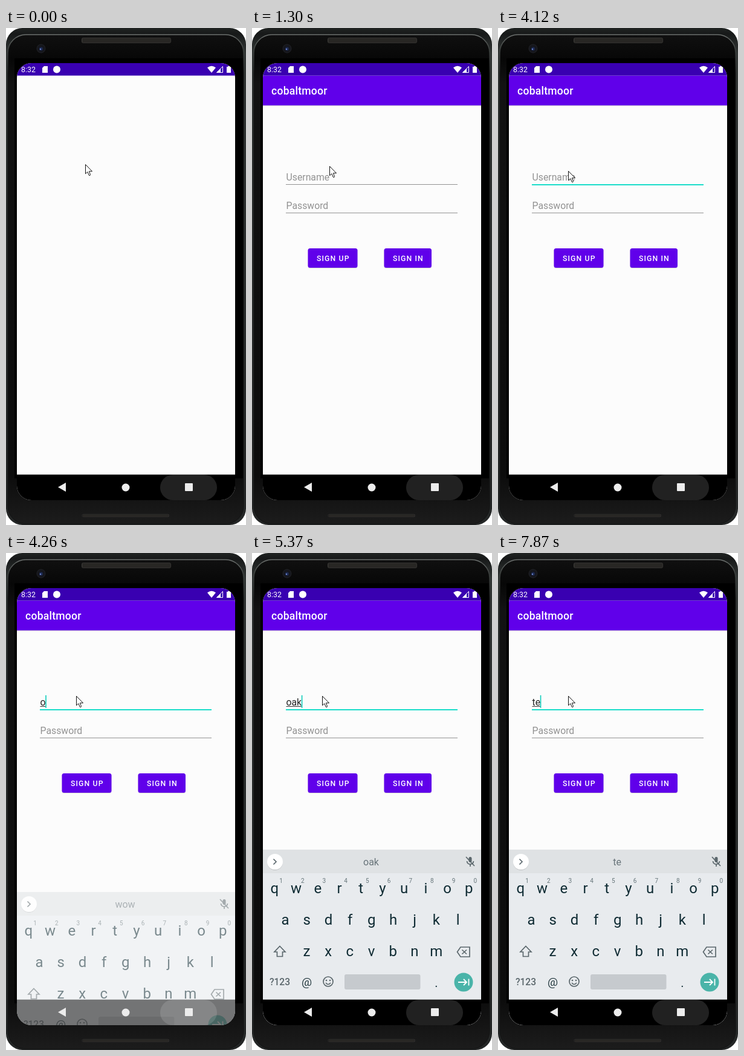
Animation of 397x821 px, one loop 8000 ms. Source, as an HTML page:

```html
<!DOCTYPE html>
<html lang="en">
<head>
<meta charset="utf-8">
<title>Sign-in screen</title>
<style>
html, body { margin: 0; width: 100%; height: 100%; overflow: hidden; background: #fff; }
svg { display: block; width: 397px; height: 821px; font-family: Roboto, sans-serif; }
.mid { text-anchor: middle; }
.medium { font-weight: 500; }
.line { fill: none; stroke: #5b676c; stroke-width: 1.7; }
</style>
</head>
<body>
<svg viewBox="0 0 397 821">
  <defs>
    <clipPath id="screen"><rect x="18" y="58" width="361" height="722" rx="24"/></clipPath>
    <linearGradient id="rim" x2="0" y2="1">
      <stop offset="0" stop-color="#202322"/><stop offset=".012" stop-color="#171919"/>
      <stop offset=".05" stop-color="#333736"/><stop offset="1" stop-color="#242626"/>
    </linearGradient>
    <linearGradient id="edge" x2="0" y2="1">
      <stop offset="0" stop-color="#6c706e"/><stop offset=".03" stop-color="#3c403e"/><stop offset=".08" stop-color="#151616"/>
    </linearGradient>
    <linearGradient id="face" x2="0" y2="1">
      <stop offset="0" stop-color="#101010"/><stop offset=".05" stop-color="#070707"/>
      <stop offset=".1" stop-color="#121212"/><stop offset=".9" stop-color="#0c0c0c"/><stop offset="1" stop-color="#1c1c1c"/>
    </linearGradient>
    <pattern id="mesh" width="2" height="2" patternUnits="userSpaceOnUse">
      <rect width="2" height="2" fill="#1d1c1a"/><rect width="1" height="1" fill="#494642"/>
    </pattern>
    <filter id="shadow" x="-10%" y="-20%" width="120%" height="160%">
      <feDropShadow dx="0" dy="1" stdDeviation=".7" flood-opacity=".16"/>
    </filter>
  </defs>

  <rect width="397" height="821" rx="27" fill="url(#rim)"/>
  <rect x="3" y="11" width="390" height="808" rx="30" fill="url(#face)" stroke="url(#edge)" stroke-width="1.6"/>
  <rect x="14" y="50" width="378" height="694" fill="#000"/>
  <rect x="125.5" y="16.5" width="147" height="8" rx="2" fill="url(#mesh)" stroke="#3a3937"/>
  <rect x="126" y="803" width="144" height="5" rx="2" fill="url(#mesh)" stroke="#262626"/>
  <circle cx="58" cy="34" r="7" fill="#15161c" stroke="#222327"/>
  <circle cx="58" cy="34.5" r="3" fill="#1c2950"/><circle cx="57" cy="35" r="1.2" fill="#6f86c9"/>

  <g clip-path="url(#screen)">
    <rect x="18" y="58" width="361" height="722" fill="#fcfcfc"/>
    <g id="app">
      <rect x="18" y="78.6" width="361" height="49.2" fill="#6002ea" filter="url(#shadow)"/>
      <text x="32" y="110" font-size="17.6" letter-spacing=".2" class="medium" fill="#fff">cobaltmoor</text>
      <text id="hint" x="56.5" y="252" font-size="15.8" fill="#929292">Username</text>
      <text x="56.5" y="298.5" font-size="15.8" fill="#929292">Password</text>
      <path d="M56 258.5H340M56 305.5H340" stroke="#939393"/>
      <rect id="focus" x="56" y="258" width="284" height="1.8" fill="#03dac5"/>
      <text id="typed" x="56.5" y="252" font-size="15.8" fill="#262626"></text>
      <rect id="composing" x="56.5" y="253" height="1" fill="#333"/>
      <rect id="caret" y="235" width="1.6" height="21" fill="#0fcdbb"/>
      <g id="buttons"></g>
    </g>
    <rect x="18" y="58" width="361" height="20.6" fill="#3900b1"/>
    <g fill="#fff">
      <text x="25" y="73" font-size="12.4">8:32</text>
      <path d="M63 63H69V74H60V66Z"/>
      <circle cx="84" cy="68.5" r="6"/>
      <path d="M333 65.5Q340 60 347 65.5L340 74Z"/>
      <path d="M348.5 73.5L358.5 63.5V73.5Z" fill="none" stroke="#fff"/><path d="M348 74L355 67V74Z"/>
      <path d="M365 64H367V63H370V64H372V74H365Z"/>
    </g>
    <g id="keyboard"></g>
    <rect id="nav" x="18" y="737.7" width="361" height="43"/>
    <rect x="255" y="738" width="94" height="42" rx="21" fill="#fff" opacity=".13"/>
    <g fill="#ececec">
      <path d="M86 758.5L99 751V766Z"/><circle cx="198" cy="759" r="6.5"/>
      <rect x="296" y="752" width="13" height="13" rx="1"/>
    </g>
  </g>
  <path id="pointer" d="M.5 .5V15.8L3.8 12.7L6.4 18.5H8L8.5 17.2L6.4 11.8H11.5Z" fill="#fff" stroke="#111"/>
</svg>
<script>
const LOOP = 8000;
const $ = id => document.getElementById(id);
const label = (text, x, y, size, fill, extra = '') =>
  `<text class="mid ${extra}" x="${x}" y="${y}" font-size="${size}" fill="${fill}">${text}</text>`;

$('buttons').innerHTML = [['SIGN UP', 92.5, 82], ['SIGN IN', 218.5, 78.5]].map(([text, x, w]) =>
  `<rect x="${x}" y="364" width="${w}" height="32" rx="3.5" fill="#6002ea" filter="url(#shadow)"/>
   <text class="medium" x="${x + 14.5}" y="385" font-size="12.3" letter-spacing="1.09" fill="#fff">${text}</text>`).join('');

const keyRow = (letters, x, y) =>
  [...letters].map((c, i) => label(c, x + i * 35.7, y, 24, '#0f2b33')).join('');
const digits = [...'1234567890'].map((d, i) => label(d, 48 + i * 35.7, 545, 10, '#66757a')).join('');

$('keyboard').innerHTML = `
  <rect x="18" y="490" width="361" height="290" fill="#e8ebee"/>
  <rect x="18" y="490" width="361" height="39" fill="#dfe2e4"/>
  <circle cx="38" cy="510" r="13" fill="#fff" filter="url(#shadow)"/>
  <path id="chevron" class="line" d="M-2.5 -4.5L2 0L-2.5 4.5"/>
  <text id="suggestion" class="mid" x="197" y="515.5" font-size="16" fill="#68747a"></text>
  <g id="tools" fill="#5b676c">
    <rect x="80" y="502.5" width="14" height="14"/>
    <path d="M140 502a7.5 7.5 0 1 0 0 15c2 0 1.5-1.5 1-2.5s0-2 2-2h2c2 0 2.5-1.5 2.5-3.5c0-4-3.5-7-7.5-7"/>
    <g fill="#dfe2e4"><circle cx="135.5" cy="509.5" r="1.2"/><circle cx="138" cy="506" r="1.2"/><circle cx="142" cy="506" r="1.2"/><circle cx="144.5" cy="509.5" r="1.2"/></g>
    <path class="line" d="M189.5 503H194.5M192 503V516M189.5 516H194.5"/>
    <path d="M184 509.5L188 506.5V512.5ZM200 509.5L196 506.5V512.5Z"/>
    <rect class="line" x="238.5" y="503" width="13" height="13" rx="1"/>
    <path d="M242 506L248 508L246.5 509.5L252 515L250 517L244.5 511.5L243 513Z"/>
    <rect x="277" y="500" width="1" height="19" fill="#c8cdd0"/>
    <circle cx="304.5" cy="510" r="1.8"/><circle cx="310" cy="510" r="1.8"/><circle cx="315.5" cy="510" r="1.8"/>
  </g>
  <rect x="358.5" y="502" width="5" height="9" rx="2.5" fill="#5b676c"/>
  <path class="line" d="M355.5 509Q356 514 361 514T366.5 509M361 514V518M354 502L368 517"/>
  ${digits}
  ${keyRow('qwertyuiop', 37.4, 562)}${keyRow('asdfghjkl', 55, 613.8)}${keyRow('zxcvbnm', 90.5, 665.6)}
  <path class="line" d="M46 649.5L55 659H50.5V666.5H41.5V659H37Z"/>
  <path class="line" d="M345 651H360V667H345L339.5 659ZM347.5 655.5L355 662.5M355 655.5L347.5 662.5"/>
  ${label('?123', 46, 714, 15.6, '#5b676c', 'medium')}
  ${label('@', 90.5, 714.5, 19, '#24393f')}
  <circle class="line" cx="126" cy="708" r="8"/>
  <path class="line" d="M122 710Q126 715 130 710"/>
  <circle cx="123" cy="706" r="1.3" fill="#5b676c"/><circle cx="129" cy="706" r="1.3" fill="#5b676c"/>
  <rect x="153" y="696" width="125.5" height="25" rx="3" fill="#c6cace"/>
  ${label('.', 305, 717, 20, '#0f2b33')}
  <circle cx="350" cy="709" r="15.5" fill="#4ab4a9"/>
  <path d="M341 709H355M350 704L355 709L350 714M358.5 703.5V714.5" fill="none" stroke="#fff" stroke-width="1.8"/>`;

// Each track lists [start time, value]; a value holds until the next one.
const tracks = {
  app: [[0, 0], [780, .22], [920, 1]],
  focus: [[0, 0], [2540, .5], [2660, 1]],
  pointer: [[0, '131 225'], [1170, '130 226'], [1300, '128 228'], [1720, '127 229'], [1840, '125 231'],
    [2120, '123 234'], [2240, '120 238'], [2390, '116 241'], [2540, '116 236']],
  typed: [[0, ''], [4260, 'o'], [4390, 'oak'], [5630, 'oa'], [5750, 'o'], [5890, ''], [7710, 't'], [7870, 'te']],
  caret: [[0, 0], [2660, 1], [4120, 0], [4260, 1], [4790, 0], [5370, 1], [6440, 0], [6980, 1], [7410, 0], [7710, 1]],
  keyboard: [[0, 0], [4260, .55], [4390, .97], [4530, 1]],
  tools: [[0, 0], [6040, 1], [7710, 0]],
};
const at = (name, t) => tracks[name].findLast(([start]) => start <= t)[1];

function draw(t) {
  for (const name of ['app', 'focus', 'caret', 'keyboard', 'tools'])
    $(name).setAttribute('opacity', at(name, t));

  const text = at('typed', t);
  $('typed').textContent = text;
  $('hint').setAttribute('opacity', text ? 0 : 1);
  const width = text ? $('typed').getComputedTextLength() : 0;
  $('composing').setAttribute('width', width);
  $('caret').setAttribute('x', 56.2 + width);

  const sliding = t >= 4260 && t < 4390;
  $('keyboard').setAttribute('transform', `translate(0 ${sliding ? 70 : 0})`);
  $('nav').setAttribute('opacity', sliding ? .52 : 1);
  $('suggestion').textContent = sliding ? 'wow' : text;
  $('chevron').setAttribute('transform', `translate(38 510) scale(${at('tools', t) ? -1 : 1} 1)`);
  $('pointer').setAttribute('transform', `translate(${at('pointer', t)})`);
}

const start = performance.now();
function tick() {
  draw((performance.now() - start) % LOOP);
  requestAnimationFrame(tick);
}
tick();
</script>
</body>
</html>
```
